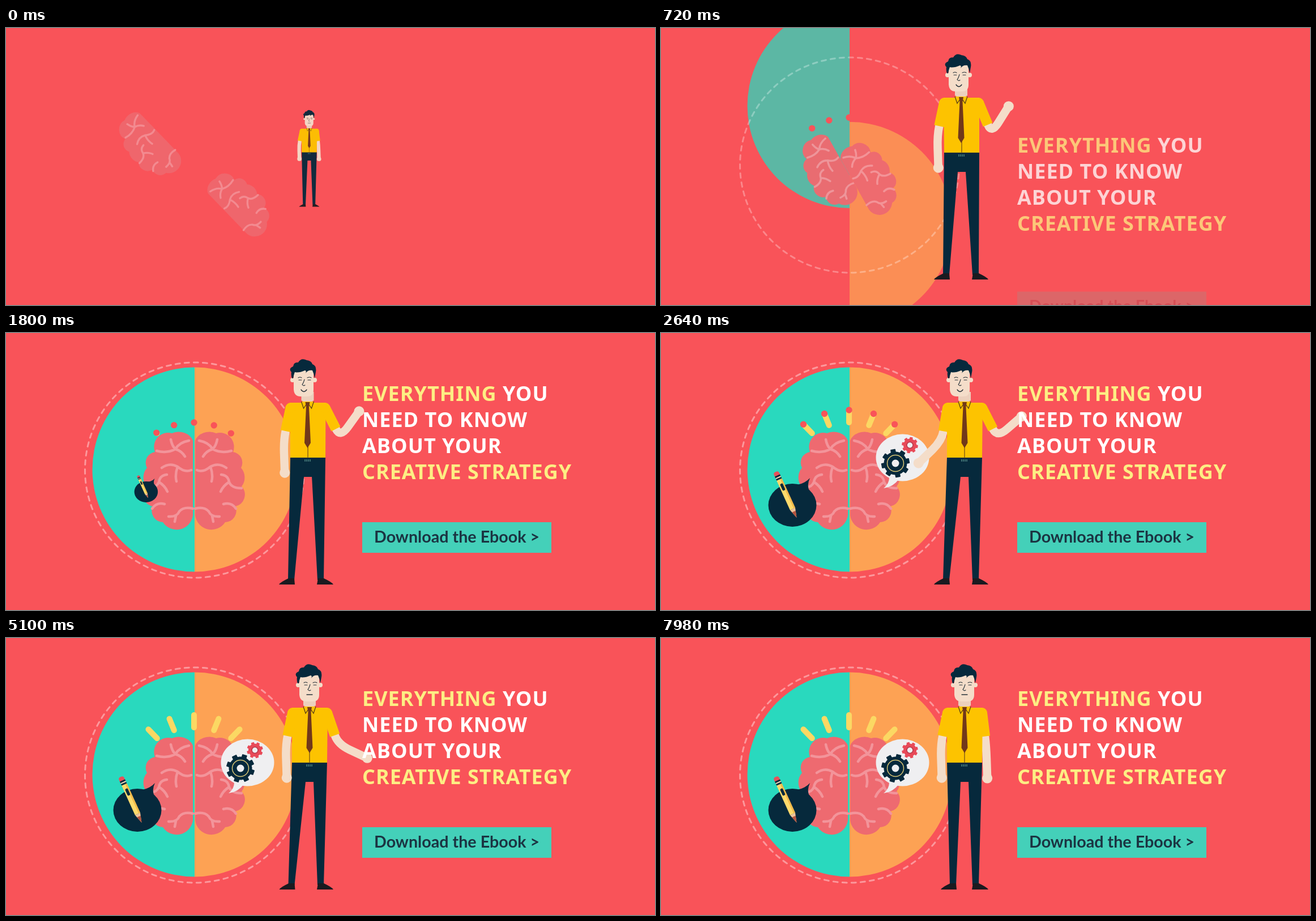
Recreate the animation shown at these times as an HTML page. Size 1146 px wide and 489 px high, loop 8000 ms.

```html
<!DOCTYPE html>
<html lang="en">
<head>
<meta charset="utf-8">
<title>Creative strategy banner</title>
<style>
html, body { margin: 0; width: 100%; height: 100%; overflow: hidden; background: #f95359; }
svg { display: block; width: 1146px; height: 489px; }
.line { fill: none; stroke-linecap: round; stroke-linejoin: round; }
#copy { font: 700 36px "Noto Sans", "Open Sans", sans-serif; letter-spacing: 1px; fill: #fff; }
#copy .hi { fill: #fdee83; }
#button text { font: 700 28.7px Lato, sans-serif; fill: #1b3442; }
</style>
</head>
<body>
<svg viewBox="0 0 1146 489">
  <defs>
    <g id="half">
      <path fill="#ee6a70" d="M330 190A26 22 0 0 0 293 177A25 25 0 0 0 263 210A19 19 0 0 0 249 238A26 26 0 0 0 248 271A21 21 0 0 0 259 306A20 20 0 0 0 277 334A29 29 0 0 0 330 322Z"/>
      <path class="line" stroke="#f3949a" stroke-width="4.500" d="M266 208Q284 213 299 205Q306 193 323 190M291 188Q293 199 299 205Q310 208 316 218
        M275 238Q289 228 303 236Q316 247 327 242M303 236Q298 250 301 262M248 274Q266 274 270 263Q272 251 284 250M270 263Q281 270 285 280
        M258 310Q266 298 280 302M287 324Q302 325 306 315Q314 306 330 310M300 323L298 333"/>
    </g>
  </defs>

  <path id="teal" fill="#29d9be" d="M333 60.500A180.500 180.500 0 0 0 333 421.500Z"/>
  <path id="orange" fill="#fda254" d="M333 60.500A180.500 180.500 0 0 1 333 421.500Z"/>
  <ellipse id="ring" cx="333" cy="242" rx="193.500" ry="190" class="line" stroke="#fff" stroke-width="3" stroke-dasharray="8 8.100"/>
  <g id="rays"></g>
  <g id="left"><use href="#half"/></g>
  <g id="right"><use href="#half" transform="matrix(-1 0 0 1 664 0)"/></g>

  <g id="idea">
    <path fill="#06293c" d="M238 268Q254 266 263 256Q256 270 264 282Z"/>
    <ellipse cx="232" cy="304" rx="42.500" ry="38" fill="#06293c"/>
    <g transform="translate(203 246) rotate(-24.500)">
      <rect x="-5" y="-1" width="10" height="12" rx="4" fill="#e8505a"/>
      <path fill="#06293c" d="M-5 6H5V14H-5Z"/>
      <path fill="#f3dcb8" d="M-5 9H5V11H-5Z"/>
      <path fill="#fdda6c" d="M-5 14H5V71H-5Z"/>
      <path fill="#f0b94a" d="M2 14H5V71H2Z"/>
      <rect x="-2.500" y="22" width="5" height="13" rx="2" fill="#06293c"/>
      <path fill="#f0c49a" d="M-5 71H5L0 88Z"/>
      <path fill="#b5533f" d="M-3.500 76H3.500L0 88Z"/>
    </g>
  </g>

  <g id="logic">
    <path fill="#efeff1" d="M403 252Q404 266 393 274Q410 272 420 258Z"/>
    <ellipse cx="426.500" cy="220" rx="47" ry="41.500" fill="#efeff1"/>
    <g id="bigGear" fill="#06293c"></g>
    <circle cx="414" cy="230" r="14.500" class="line" stroke="#d9c574" stroke-width="1.500"/>
    <circle cx="414" cy="230" r="6.500" fill="#efeff1"/>
    <g id="smallGear" fill="#e84a58"></g>
    <circle cx="439.500" cy="198" r="5.500" fill="#efeff1" stroke="#b73a4c" stroke-width="1.500"/>
  </g>

  <g id="man">
    <path id="legs" fill="#06293c"/>
    <path id="shoeL" fill="#1b1a20" d="M494 444Q496 440 511 433H521L522 444Z"/>
    <path fill="#1b1a20" d="M578 444Q576 440 561 433H551L549 444Z"/>
    <g id="arms" class="line"></g>
    <path id="shirt" fill="#fdc300"/>
    <g id="sleeves"></g>
    <g id="waist">
      <path class="line" stroke="#8a6212" stroke-width="1.500" d="M536 200V220"/>
      <path stroke="#3c6d70" stroke-width="4" stroke-dasharray="2 1" d="M530 225H541"/>
    </g>
    <g id="chest">
      <path fill="#ecd0bd" d="M525 104H547V119Q536 127 525 119Z"/>
      <path fill="#fdc300" stroke="#5d4314" stroke-width="1.300" d="M525 121L529 133L536 123L543 133L547 121"/>
      <path fill="#71381a" d="M532 122H540L538.500 130L541.500 194L536 203L530.500 194L533.500 130Z"/>
    </g>
    <g id="head">
      <circle cx="516" cy="83" r="4" fill="#f4ddc9"/>
      <circle cx="555" cy="83" r="4" fill="#f4ddc9"/>
      <path fill="#f4ddc9" d="M518 62H553V100Q553 112 542 112H530Q519 112 518 100Z"/>
      <path fill="#06293c" d="M515 80Q513 75 514 69Q508 63 517 59Q518 51 526 52Q531 43 541 48Q549 49 551 55Q559 58 557 69L555 80Q554 72 551 66Q543 65 539 71Q541 67 538 66Q527 71 520 69Q518 74 517 80Z"/>
      <path class="line" stroke="#26323a" stroke-width="1.100" d="M526 79Q529 77 532 79M542 79Q546 77 549 79M527 83H532M543 83H548M537 82Q535 89 533 91Q535 94 538 92"/>
      <path id="mouth" class="line" stroke="#26323a" stroke-width="1.300"/>
    </g>
  </g>

  <g id="copy">
    <text x="629" y="120"><tspan class="hi">EVERYTHING</tspan> YOU</text>
    <text x="629" y="166">NEED TO KNOW</text>
    <text x="629" y="212">ABOUT YOUR</text>
    <text x="629" y="258" class="hi">CREATIVE STRATEGY</text>
  </g>
  <g id="button">
    <rect x="629" y="334" width="334" height="54" fill="#44d0b9"/>
    <text x="650" y="369.500">Download the Ebook &gt;</text>
  </g>
</svg>
<script>
const LOOP = 8000, RAYS = 5;
const $ = id => document.getElementById(id);
const set = (el, attrs) => { for (const k in attrs) el.setAttribute(k, attrs[k]); };
const span = (t, start, length) => Math.min(1, Math.max(0, (t - start) / length));
const easeInOut = (x, n) => x < .5 ? (2 * x) ** n / 2 : 1 - (2 - 2 * x) ** n / 2;
const easeBack = (x, s) => 1 + (s + 1) * (x - 1) ** 3 + s * (x - 1) ** 2;
const ramp = (t, from, to, n = 2) => easeInOut(span(t, from, to - from), n);
const mix = (a, b, p) => a.map((v, i) => v + (b[i] - v) * p);

// Angle in degrees, measured from straight down
function step([x, y], angle, length) {
  const a = angle * Math.PI / 180;
  return [x + length * Math.sin(a), y + length * Math.cos(a)];
}

function buildGear(id, radius, tooth) {
  let out = `<circle r="${radius}"/>`;
  for (let a = 0; a < 360; a += 45)
    out += `<rect x="${-tooth / 2}" y="${-radius - tooth / 2}" width="${tooth}" height="${tooth}" rx="1" transform="rotate(${a})"/>`;
  $(id).innerHTML = out;
}

function arm(shoulder, upper, lower) {
  const elbow = step(shoulder, upper, 59), hand = step(elbow, lower, 57);
  const cuff = step(shoulder, upper, 42);
  const bend = mix(elbow, hand, .4);
  return {
    skin: `<path stroke="#f4ddc9" stroke-width="14.500" d="M${shoulder}L${cuff}Q${elbow} ${bend}L${hand}"/>
      <circle cx="${hand[0]}" cy="${hand[1]}" r="9" fill="#f4ddc9"/>`,
    sleeve: `<path stroke="#fdc300" stroke-width="18" d="M${shoulder}L${cuff}"/>
      <circle cx="${shoulder[0]}" cy="${shoulder[1]}" r="9" fill="#fdc300"/>`
  };
}

function drawMan(t) {
  const start = ramp(t, 0, 660), finish = ramp(t, 6180, 6660), drop = ramp(t, 4350, 5000);
  const lean = start - ramp(t, 1100, 2640);
  const foot = -12 * (start - ramp(t, 5000, 5700));
  const head = -10 * (start - ramp(t, 1900, 4200));
  const smile = start - drop;
  const grow = ramp(t, -60, 620), scale = .42 + .58 * grow;
  set($('man'), {
    transform: `translate(535 219) scale(${scale}) translate(-535 -219)`,
    opacity: .95 + .05 * grow
  });

  const hip = x => x - 5 * lean, chest = x => x - 6 * lean;
  set($('legs'), { d: `M${hip(505)} 219H${hip(567)}L561 436H550L${hip(543)} 254H${hip(529)}L${521 + foot} 436H${510 + foot}Z` });
  set($('shoeL'), { transform: `translate(${foot})` });
  set($('shirt'), { d: `M${chest(505)} 123H${chest(568)}L${hip(567)} 220H${hip(505)}Z` });
  set($('waist'), { transform: `translate(${hip(0)})` });
  set($('chest'), { transform: `translate(${chest(0)})` });
  set($('head'), { transform: `translate(${head})` });
  set($('mouth'), { d: `M531 100Q536 ${100 + smile * 7} 541 100` });

  const point = ramp(t, 1850, 2400) - drop;
  const l = arm([chest(506), 132], 2 * point - 12, 2 - 48 * point);
  const r = arm([chest(567), 132],
    7 + 20 * ramp(t, 0, 1080) - 8 * drop - 12 * finish,
    2 + 146 * start - 30 * ramp(t, 1080, 4000) - 53 * drop - 63 * finish);
  $('arms').innerHTML = l.skin + r.skin;
  $('sleeves').innerHTML = l.sleeve + r.sleeve;
}

function drawBrain(t) {
  const turn = ramp(t, -16, 1584, 5);
  const away = 1 - ramp(t, -30, 770, 3);
  const swing = 4 * turn * (1 - turn);
  for (const [id, side] of [['left', 1], ['right', -1]]) {
    const cx = 332 - 44 * side;
    const dx = side * (swing * 5 - away * 39), dy = side * (swing * -4 - away * 49);
    set($(id), {
      transform: `translate(${cx + dx} ${258 + dy}) rotate(${-44 * (1 - turn)}) scale(${.75 + .25 * turn ** 2}) translate(${-cx} -258)`,
      opacity: .85 + .15 * span(t, 0, 900)
    });
  }
}

// Dots fan out above the brain, then ride outwards on growing bars
function drawRays(t) {
  const parts = $('rays').children;
  for (let i = 0; i < RAYS; i++) {
    const angle = (i - 2) * 22, a = angle * Math.PI / 180;
    const base = [332 + 94 * Math.sin(a), 226 - 68 * Math.cos(a)];
    const grow = ramp(t, 1650 + i * 60, 2250 + i * 60, 3);
    const tip = step(base, 180 - angle, 22 * grow);
    set(parts[2 * i], { d: `M${base}L${tip}`, opacity: grow > 0 ? 1 : 0 });
    const size = span(t, i * 270 - 60, 160) * (1 - span(t, 2900 + i * 60, 400));
    set(parts[2 * i + 1], { cx: tip[0], cy: tip[1], r: 5.7 * size });
  }
}

function popBubble(id, t, start, x, y) {
  const p = span(t, start, 600);
  set($(id), { transform: `translate(${x} ${y}) scale(${p ? easeBack(p, 2.6) : 0}) translate(${-x} ${-y})` });
}

function draw(t) {
  const intro = ramp(t, -72, 1242, 3), call = ramp(t, 255, 1640, 3);
  const shift = (id, dy, opacity) => set($(id), { transform: `translate(0 ${dy})`, opacity });
  shift('teal', -415 * (1 - intro), intro);
  shift('orange', 422 * (1 - intro), intro);
  shift('copy', 400 * (1 - intro), intro);
  shift('button', 155 * (1 - call), call);
  set($('ring'), { opacity: .4 * intro });
  drawBrain(t);
  drawRays(t);
  popBubble('idea', t, 1740, 262, 258);
  popBubble('logic', t, 1900, 394, 273);
  set($('bigGear'), { transform: `translate(414 230) rotate(${t * .03})` });
  set($('smallGear'), { transform: `translate(439.500 198) rotate(${-t * .03})` });
  drawMan(t);
}

buildGear('bigGear', 20.5, 9);
buildGear('smallGear', 11.5, 5.5);
$('rays').innerHTML = '<path class="line" stroke="#fbd863" stroke-width="10"/><circle fill="#f95359"/>'.repeat(RAYS);

const begin = performance.now();
function tick() {
  draw((performance.now() - begin) % LOOP);
  requestAnimationFrame(tick);
}
tick();
</script>
</body>
</html>
```
